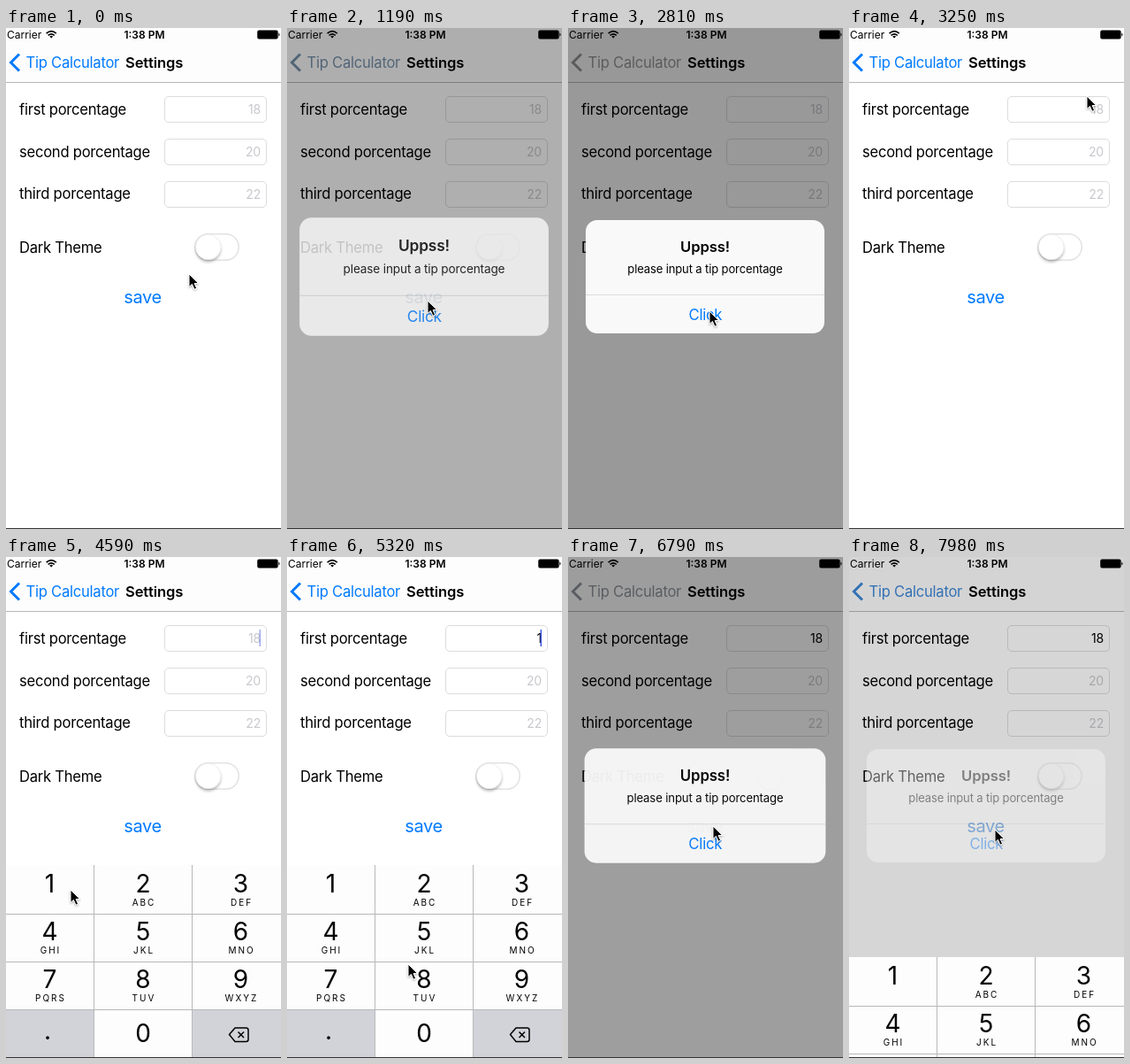
Recreate the animation shown at these times as an HTML page. Size 311 px wide and 566 px high, loop 8000 ms.

```html
<!DOCTYPE html>
<html lang="en">
<head>
<meta charset="utf-8">
<title>Tip settings</title>
<style>
  html, body { margin: 0; width: 100%; height: 100%; overflow: hidden; background: #fff; }
  svg { display: block; width: 311px; height: 566px; }
  text { font: 16.6px Inter, "Open Sans", sans-serif; letter-spacing: -.25px; }
  .bold { font-weight: 600; letter-spacing: -.12px; }
  .mid { text-anchor: middle; }
  .status { font-size: 12px; letter-spacing: 0; }
  .save { font-size: 20px; letter-spacing: -.4px; }
  .message { font-size: 13px; letter-spacing: -.12px; }
  .value { font-size: 14px; letter-spacing: -.2px; text-anchor: end; fill: #c7c7cd; }
  .digit { font-size: 28px; letter-spacing: 0; text-anchor: middle; }
  .letters { font-size: 10px; letter-spacing: 2px; text-anchor: middle; }
  .line { fill: none; stroke: #b8b8bb; }
  .field { fill: #fff; stroke: #dcdcdc; }
</style>
</head>
<body>
<svg viewBox="0 0 311 566">
  <defs>
    <filter id="soft" x="-50%" y="-50%" width="200%" height="200%">
      <feDropShadow dx="0" dy="2.5" stdDeviation="1.8" flood-opacity=".28"/>
    </filter>
    <filter id="arrowShadow" x="-50%" y="-50%" width="200%" height="200%">
      <feDropShadow dx="0" dy="1" stdDeviation=".8" flood-opacity=".35"/>
    </filter>
  </defs>
  <rect width="311" height="566" fill="#fff"/>
  <rect width="311" height="61" fill="#fdfdfd"/>
  <path class="line" d="M0 61.5H311"/>

  <text class="status" x="1" y="11.5">Carrier</text>
  <g fill="none" stroke="#000" stroke-width="1.6">
    <path d="M45.6 6.2Q51.2 1 56.8 6.2M47.6 8.4Q51.2 5.2 54.8 8.4"/>
    <path d="M49.3 9.4L51.2 11.5L53.1 9.4Q51.2 8 49.3 9.4Z" fill="#000" stroke="none"/>
  </g>
  <text class="status bold mid" x="156.5" y="11.5">1:38 PM</text>
  <rect x="284.2" y="2.4" width="23.4" height="10" rx="2"/>
  <path d="M308.4 5.4Q310.8 7.4 308.4 9.4Z"/>

  <path id="chevron" d="M15 29.5L5.5 39L15 48.5" fill="none" stroke-width="3"/>
  <text id="back" x="22.5" y="45">Tip Calculator</text>
  <text class="bold" x="135" y="45">Settings</text>

  <g id="rows"></g>
  <rect id="caret" x="286.5" y="82" width="1.5" height="19" fill="#4259dc"/>

  <text x="15" y="254">Dark Theme</text>
  <rect x="213.7" y="232.7" width="49.6" height="29.6" rx="14.8" fill="#fff" stroke="#e2e2e2" stroke-width="1.5"/>
  <circle cx="228.7" cy="247.5" r="14.2" fill="#fff" stroke="#e0e0e0" stroke-width=".5" filter="url(#soft)"/>
  <text id="save" class="save mid" x="154.5" y="311">save</text>

  <rect id="dim" width="311" height="566"/>
  <g id="alert">
    <rect x="20" y="217" width="270" height="128" rx="13" fill="#f9f9f9"/>
    <path id="pressed" d="M20 302H290V332Q290 345 277 345H33Q20 345 20 332Z" fill="#e4e4e4"/>
    <path d="M20 301.5H290" fill="none" stroke="#dcdcdf"/>
    <text class="bold mid" x="155" y="253">Uppss!</text>
    <text class="message mid" x="155" y="277">please input a tip porcentage</text>
    <text class="mid" x="155.3" y="330" fill="#007aff">Click</text>
  </g>

  <g id="keyboard">
    <rect y="348" width="311" height="218" fill="#fdfdfd"/>
    <path d="M0 511H99V566H0ZM211 511H311V566H211Z" fill="#d1d3d9"/>
    <rect id="keyDown" height="54" fill="#d1d3d9"/>
    <path class="line" d="M99.5 348V566M210.5 348V566M0 403.5H311M0 457.5H311M0 511.5H311"/>
    <g id="keys"></g>
    <path d="M252.5 539.5L259 532H271.5Q274 532 274 534.5V545Q274 547.5 271.5 547.5H259ZM262.5 536.5L269 543M269 536.5L262.5 543" fill="none" stroke="#000" stroke-width="1.5" stroke-linejoin="round"/>
  </g>

  <path id="cursor" d="M0 0V14.5L3.4 11.4L6 17.3L8.6 16.1L6.1 10.5H10.7Z" stroke="#fff" stroke-width="1" filter="url(#arrowShadow)"/>
  <rect y="565" width="311" height="1" fill="#333"/>
</svg>
<script>
const $ = id => document.getElementById(id);
const set = (id, attrs) => {
  for (const name in attrs) $(id).setAttribute(name, attrs[name]);
};

const fields = [["first", 18, 77, 98], ["second", 20, 125, 146], ["third", 22, 173, 193]];
$("rows").innerHTML = fields.map(([name, hint, top, base]) => `
  <text x="15" y="${base}">${name} porcentage</text>
  <rect class="field" x="179.5" y="${top + .5}" width="115" height="29" rx="4.5"/>
  <text class="value" id="${name}" x="288" y="${top + 20}">${hint}</text>`).join("");

const columns = [49.5, 155, 265.5];
const letters = ["", "ABC", "DEF", "GHI", "JKL", "MNO", "PQRS", "TUV", "WXYZ"];
$("keys").innerHTML = letters.map((label, i) => {
  const x = columns[i % 3], y = 379 + 54 * Math.floor(i / 3);
  return `<text class="digit" x="${x}" y="${y}">${i + 1}</text>
    <text class="letters" x="${x + 1}" y="${y + 15}">${label}</text>`;
}).join("") + `<text class="digit" x="155" y="548">0</text>
  <text class="digit" x="47" y="545">.</text>`;

// Tracks are lists of [tick, value, ...], joined by straight lines.
const LOOP = 8000, TICK = 147.5;
const cursorPath = [
  [0, 207, 278], [4, 159, 308], [12, 159, 308], [13, 150, 290], [15, 112, 227],
  [17, 158, 290], [18, 174, 324], [19, 160, 320], [21, 160, 320],
  [22, 269, 77], [23, 269, 77], [25, 263, 86], [26, 263, 86],
  [30, 80, 370], [31, 73, 376], [33, 73, 376], [34, 106, 412], [37, 153, 484],
  [39, 153, 484], [42, 164, 304], [49, 164, 304], [50, 160, 322], [51, 154, 333],
  [53, 154, 333], [54, 165, 308]
];
const keyboardDrop = [
  [26, 218], [27, 110], [28, 20], [29, 0], [44, 0], [45, 110], [46, 218], [53, 218], [54, 104]
];
const caretFade = [[26, 0], [27, 1], [30, 1], [32, 0], [33, 1], [44, 1], [45, 0]];

function track(points, n) {
  const next = points.findIndex(p => p[0] > n);
  if (next < 0) return points.at(-1).slice(1);
  if (next === 0) return points[0].slice(1);
  const a = points[next - 1], b = points[next];
  const k = (n - a[0]) / (b[0] - a[0]);
  return a.slice(1).map((v, i) => v + (b[i + 1] - v) * k);
}

const between = (n, from, to) => n >= from && n <= to;
const mix = (a, b, k) => Math.round(a + (b - a) * k);

function alertState(n) {
  if (n === 21 || n === 54) return { shown: .4, scale: 1 };
  const start = between(n, 8, 20) ? 7.1 : between(n, 45, 53) ? 44.24 : null;
  if (start === null) return { shown: 0, scale: 1 };
  const rest = Math.exp(-1.7 * (n - start));
  return { shown: 1 - rest, scale: 1 + .2 * rest };
}

function draw(n) {
  const { shown, scale } = alertState(n);
  const tint = `rgb(${mix(0, 152, shown)},${mix(122, 152, shown)},${mix(255, 152, shown)})`;
  set("chevron", { stroke: tint });
  set("back", { fill: tint });
  set("save", { fill: tint, opacity: between(n, 6, 7) || between(n, 43, 44) ? .2 : 1 });
  set("dim", { opacity: .4 * shown });
  set("alert", {
    opacity: shown,
    transform: `translate(155 281) scale(${scale}) translate(-155 -281)`
  });
  set("pressed", { opacity: n === 53 ? 1 : 0 });

  const typed = n >= 39 ? "18" : n >= 33 ? "1" : "";
  $("first").textContent = typed || "18";
  $("first").style.fill = typed ? "#000" : "";
  set("caret", { opacity: track(caretFade, n)[0] });

  set("keyboard", { transform: `translate(0 ${track(keyboardDrop, n)[0]})` });
  const one = between(n, 32, 33), eight = between(n, 38, 39);
  set("keyDown", {
    x: one ? 0 : 100, y: one ? 349 : 457,
    width: one ? 99 : 110, opacity: one || eight ? 1 : 0
  });
  set("cursor", { transform: `translate(${track(cursorPath, n).map(Math.round).join(" ")})` });
}

let lastTick = -1;
function frame() {
  const n = Math.floor(performance.now() % LOOP / TICK);
  if (n !== lastTick) draw(lastTick = n);
  requestAnimationFrame(frame);
}
frame();
</script>
</body>
</html>
```
